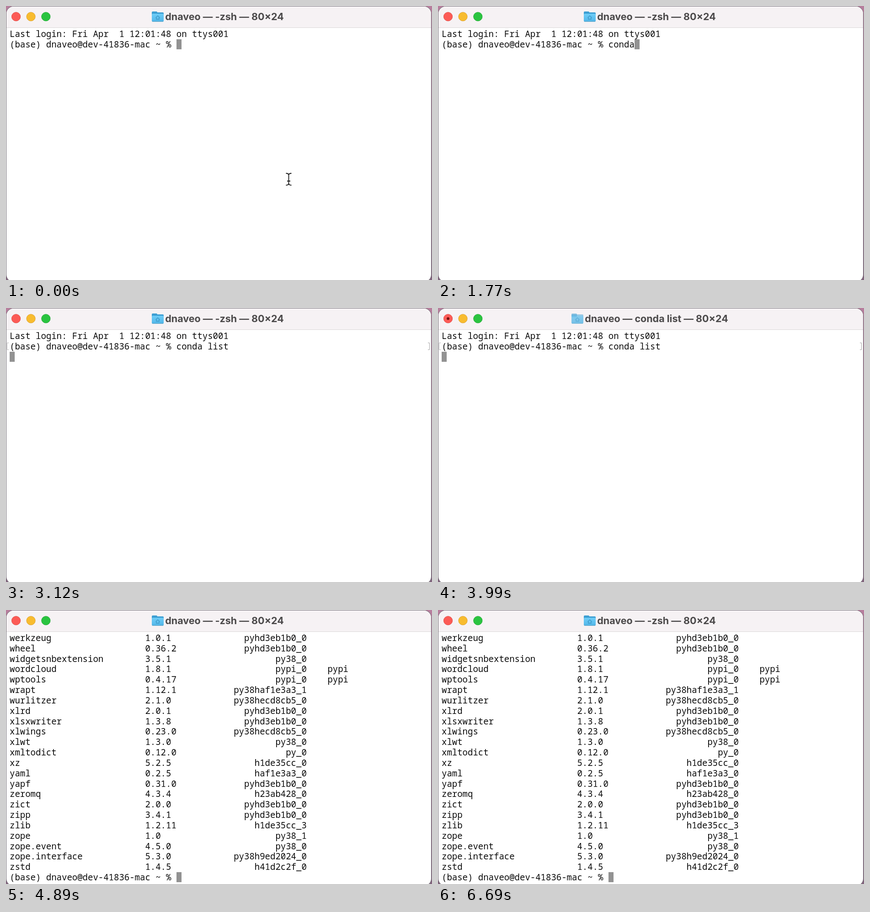
Write an HTML page with a canvas that moves like this. It is 932 px wide and 601 px high and loops after 7740 ms.

```html
<!DOCTYPE html>
<html lang="en">
<head>
<meta charset="utf-8">
<title>Terminal: conda list</title>
<style>
  html, body { margin: 0; width: 100%; height: 100%; overflow: hidden; background: #fff; }
  canvas { display: block; width: 932px; height: 601px; }
</style>
</head>
<body>
<canvas id="stage" width="932" height="601"></canvas>
<script>
const ctx = document.getElementById('stage').getContext('2d');
const W = 932, H = 601, LOOP = 7740;
const LEFT = 8, COL = 11.4, ROW = 22.83;
const MONO = '500 19px "Noto Sans Mono", "DejaVu Sans Mono", monospace';
const TITLE = '700 21.5px Inter, Roboto, sans-serif';

const USER = 'dnaveo';
const LOGIN = 'Last login: Fri Apr  1 12:01:48 on ttys001';
const PROMPT = `(base) ${USER}@dev-41836-mac ~ % `;
const COMMAND = 'conda list';

// When each character of the command appears, in ms
const KEYS = [1170, 1320, 1440, 1590, 1740, 1950, 2160, 2610, 2700, 2790];
const ENTER = 3060, BUSY = 3150, OUTPUT = 4110, IDLE = 4860;

const PACKAGES = `werkzeug 1.0.1 pyhd3eb1b0_0
wheel 0.36.2 pyhd3eb1b0_0
widgetsnbextension 3.5.1 py38_0
wordcloud 1.8.1 pypi_0 pypi
wptools 0.4.17 pypi_0 pypi
wrapt 1.12.1 py38haf1e3a3_1
wurlitzer 2.1.0 py38hecd8cb5_0
xlrd 2.0.1 pyhd3eb1b0_0
xlsxwriter 1.3.8 pyhd3eb1b0_0
xlwings 0.23.0 py38hecd8cb5_0
xlwt 1.3.0 py38_0
xmltodict 0.12.0 py_0
xz 5.2.5 h1de35cc_0
yaml 0.2.5 haf1e3a3_0
yapf 0.31.0 pyhd3eb1b0_0
zeromq 4.3.4 h23ab428_0
zict 2.0.0 pyhd3eb1b0_0
zipp 3.4.1 pyhd3eb1b0_0
zlib 1.2.11 h1de35cc_3
zope 1.0 py38_1
zope.event 4.5.0 py38_0
zope.interface 5.3.0 py38h9ed2024_0
zstd 1.4.5 h41d2c2f_0`.split('\n').map(line => {
  const [name, version, build, channel = ''] = line.split(' ');
  return name.padEnd(26) + version.padEnd(11) + build.padStart(20) + '    ' + channel;
});

function roundRect(x, y, w, h, r, fill) {
  ctx.beginPath();
  ctx.roundRect(x, y, w, h, r);
  ctx.fillStyle = fill;
  ctx.fill();
}

function disc(x, y, r, fill, edge) {
  ctx.beginPath();
  ctx.arc(x, y, r, 0, Math.PI * 2);
  ctx.fillStyle = fill;
  ctx.fill();
  if (edge) {
    ctx.strokeStyle = edge;
    ctx.lineWidth = 1;
    ctx.stroke();
  }
}

function polyline(points, color, width) {
  ctx.beginPath();
  points.forEach(([x, y]) => ctx.lineTo(x, y));
  ctx.strokeStyle = color;
  ctx.lineWidth = width;
  ctx.stroke();
}

function drawWindow() {
  const backdrop = ctx.createLinearGradient(0, 0, 0, H);
  backdrop.addColorStop(0, '#b77e9d');
  backdrop.addColorStop(1, '#80637c');
  ctx.fillStyle = backdrop;
  ctx.fillRect(0, 0, W, H);
  roundRect(0, 0, 931, 606, 17, '#77727a');
  roundRect(1, 1, 929, 604, 16, '#fff');
  roundRect(1, 1, 929, 46, [16, 16, 0, 0], '#f6f2f4');
  ctx.fillStyle = '#d9d6d8';
  ctx.fillRect(1, 47, 929, 1);
}

function drawFolder(x, pale) {
  ctx.save();
  ctx.translate(x, 0);
  ctx.globalAlpha = pale ? 0.5 : 1;
  roundRect(0, 12, 12, 8, 2, '#3d9fd3');
  roundRect(0, 14, 26, 20, 2, '#3d9fd3');
  const front = ctx.createLinearGradient(0, 17, 0, 34);
  front.addColorStop(0, '#6fcdf7');
  front.addColorStop(1, '#52b7e9');
  roundRect(0, 17, 26, 17, 2, front);
  ctx.fillStyle = '#489fca';
  ctx.fillRect(1, 33, 24, 1.5);
  polyline([[8.5, 25.5], [13, 21.5], [17.5, 25.5]], '#3e98c6', 1.4);
  polyline([[10, 25], [10, 29], [16, 29], [16, 25]], '#3e98c6', 1.4);
  ctx.restore();
}

function drawTitleBar(busy) {
  disc(22, 23.3, 9.6, '#fc5b56', '#e4504a');
  disc(54.5, 23.3, 9.6, '#f8bc2f', '#dfa431');
  disc(87.3, 23.3, 9.6, '#2ac440', '#27ad38');
  if (busy) disc(22, 23.3, 3, '#74110d');

  drawFolder(busy ? 292 : 319, busy);
  ctx.font = TITLE;
  ctx.fillStyle = '#4b494a';
  ctx.textAlign = 'center';
  ctx.fillText(`${USER} — ${busy ? COMMAND : '-zsh'} — 80×24`, 478, 30.5);
}

function drawLine(text, row) {
  ctx.font = MONO;
  ctx.fillStyle = '#0c0c0c';
  ctx.textAlign = 'left';
  ctx.fillText(text, LEFT, 68 + row * ROW);
}

function drawCaret(col, row) {
  ctx.fillStyle = '#929292';
  ctx.fillRect(Math.round(LEFT + col * COL), Math.round(50.2 + row * ROW), 11, 22);
}

function drawMarks() {
  polyline([[6, 76.5], [2.5, 76.5], [2.5, 91.5], [6, 91.5]], '#b4b4b4', 1);
  polyline([[923, 76.5], [926.5, 76.5], [926.5, 91.5], [923, 91.5]], '#a4a4a4', 1);
}

function drawPointer(x, y) {
  const shape = (color, width) => {
    ctx.beginPath();
    for (const s of [-1, 1]) {
      ctx.moveTo(x - 6, y + s * 13);
      ctx.quadraticCurveTo(x, y + s * 13, x, y + s * 9);
      ctx.quadraticCurveTo(x, y + s * 13, x + 6, y + s * 13);
    }
    ctx.moveTo(x, y - 10);
    ctx.lineTo(x, y + 10);
    ctx.moveTo(x - 3.5, y + 4);
    ctx.lineTo(x + 3.5, y + 4);
    ctx.strokeStyle = color;
    ctx.lineWidth = width;
    ctx.stroke();
  };
  shape('#fff', 4);
  shape('#1c1c1c', 1.8);
}

function render(t) {
  drawWindow();
  drawTitleBar(t >= BUSY && t < IDLE);

  if (t >= OUTPUT) {
    PACKAGES.forEach(drawLine);
    drawCaret(PROMPT.length, 23);
    drawLine(PROMPT, 23);
    return;
  }

  const typed = COMMAND.slice(0, KEYS.filter(key => t >= key).length);
  const input = PROMPT + typed;
  drawLine(LOGIN, 0);
  drawLine(input, 1);
  if (t >= ENTER) {
    drawMarks();
    drawCaret(0, 2);
  } else {
    drawCaret(input.length, 1);
  }
  if (t < KEYS[0]) drawPointer(618.5, 380);
}

const start = performance.now();
function tick() {
  render((performance.now() - start) % LOOP);
  requestAnimationFrame(tick);
}
tick();
</script>
</body>
</html>
```
